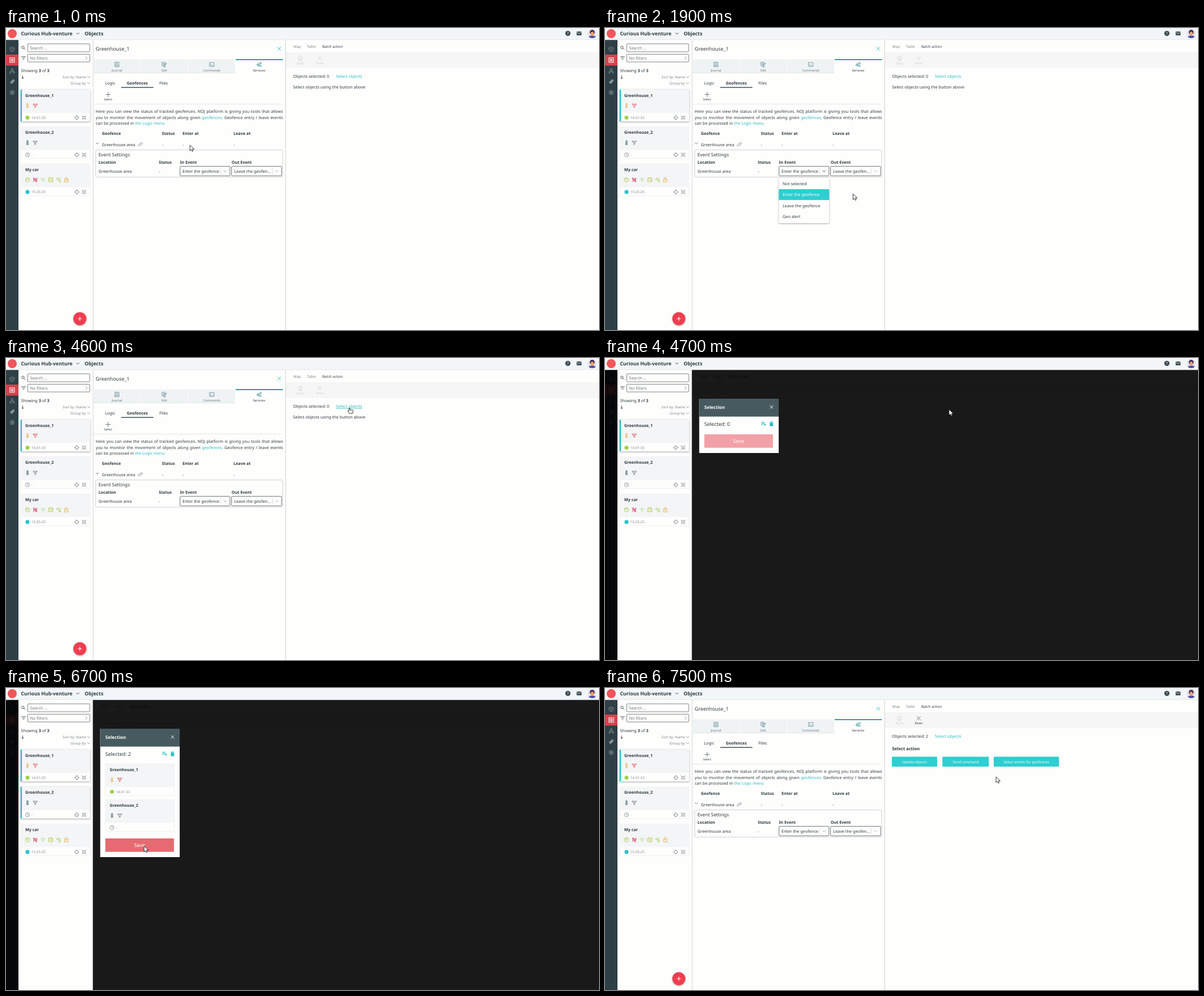
Recreate the animation shown at these times as an HTML page. Size 1048 by 534 pixels, loop 8000 ms.

```html
<!DOCTYPE html>
<html lang="en">
<head>
<meta charset="utf-8">
<title>Geofence objects</title>
<style>
  html, body { margin: 0; height: 100%; overflow: hidden; background: #fefefc; }
  svg { display: block; width: 100vw; height: 100vh; }
  svg, p { font-family: "Noto Sans", "Open Sans", sans-serif; text-rendering: geometricPrecision; }
  .raised { filter: drop-shadow(0 1px 1.5px #0005); }
  p { margin: 0; font-size: 7.28px; line-height: 10.2px; color: #2f3b40; white-space: nowrap; }
  p.full { text-align-last: justify; }
  p b { font-weight: 400; color: #2bbcc2; }
</style>
</head>
<body>
<svg viewBox="0 0 1048 534"></svg>
<script>
const stage = document.querySelector('svg');
const ink = '#2f3b40', grey = '#7d8689', teal = '#2fced0', link = '#2bbcc2', paper = '#fefefc', soft = '#f3f5f6';

// y is the middle of the capitals
const text = (x, y, s, size = 7.28, fill = ink, attrs = '') =>
  `<text x="${x}" y="${y + size * .36}" font-size="${size}" fill="${fill}" ${attrs}>${s}</text>`;
const bold = (x, y, s, size = 7.2, fill = ink) => text(x, y, s, size, fill, 'font-weight="700"');
const mid = (x, y, s, size, fill) => text(x, y, s, size, fill, 'text-anchor="middle"');
const rect = (x, y, w, h, fill, attrs = '') =>
  `<rect x="${x}" y="${y}" width="${w}" height="${h}" fill="${fill}" ${attrs}/>`;
const frame = (x, y, w, h, stroke, r = 1) => rect(x, y, w, h, paper, `stroke="${stroke}" stroke-width=".9" rx="${r}"`);
const dot = (x, y, r, fill) => `<circle cx="${x}" cy="${y}" r="${r}" fill="${fill}"/>`;
const icon = (x, y, d, color = grey, w = .8, fill = 'none') =>
  `<path transform="translate(${x} ${y})" d="${d}" fill="${fill}" stroke="${color}" stroke-width="${w}"/>`;
const ring = (r, x = 0, y = 0) => `M${x - r} ${y}a${r} ${r} 0 1 0 ${2 * r} 0a${r} ${r} 0 1 0 ${-2 * r} 0`;
const cross = r => `M${-r} ${-r}L${r} ${r}M${r} ${-r}L${-r} ${r}`;
const plus = r => `M${-r} 0H${r}M0 ${-r}V${r}`;

const shapes = {
  down: 'M-2.5-1.2L0 1.2 2.5-1.2',
  right: 'M-1.5-3L1.5 0-1.5 3',
  cube: 'M0-4.4L4-2.4V2L0 4.2-4 2V-2.4ZM-4-2.4L0-.4 4-2.4M0-.4V4.2',
  object: 'M-4-4H4V4H-4ZM-1.4-1.4H1.4V1.4H-1.4Z',
  tree: 'M-1.2-4H1.2V-1.6H-1.2ZM0-1.6V1.6M-3 1.6V.2H3V1.6M-4 1.6H-2V3.8H-4ZM2 1.6H4V3.8H2Z',
  tag: 'M-3.8 1L.8-3.6H3.6V-.8L-1 3.8Z',
  globe: ring(3.8) + ring(1.4) + 'M-3.5-1.5L3.5 1.5M-1.5 3.5L1.5-3.5',
  thermo: 'M-1.1 1V-3.2Q0-4.6 1.1-3.2V1A1.7 1.7 0 1 1-1.1 1Z',
  nodes: ring(1.1, -2.6, -2) + ring(1.1, 2.6, -2) + ring(1.1, 0, 2.4) + 'M-1.8-1L-.6 1.4M1.8-1L.6 1.4M0-3.4V-1',
  clock: ring(3.6) + 'M0-2.2V.2H1.8',
  gauge: ring(3.7) + 'M0 .5L1.8-1.8M-2.2 0A2.2 2.2 0 0 1 0-2.2',
  fan: ring(1.2, -2, -2) + ring(1.2, 2, -1) + ring(1.2, 1.4, 2.4) + 'M-3.6 3.2L3.6-3.2M-3.4-3.4L3.4 3.4M-3.4.8H0',
  wifi: 'M-4-1.2Q0-4.6 4-1.2M-2.6.6Q0-1.6 2.6.6M-1.2 2.2Q0 1.2 1.2 2.2M-.4 3.2H.4',
  battery: 'M-3.6-2.6H3.6V3.4H-3.6ZM-2.4-2.6V-3.8H-1M1-3.8H2.4V-2.6M-2.4.4H-.6M.6.4H2.4M1.5-.5V1.3',
  satellite: 'M-3.6-1.2L-1.2-3.6 1.4-1 -1-.0ZM-1 0L3.4 3.4M.4 3.4H3.4V.8M2-3.4Q3.6-2.4 3.4-.6',
  lock: 'M-3-.8H3V3.8H-3ZM-1.8-.8V-2.4A1.8 1.8 0 0 1 1.8-2.4V-.8M0 .8V2.2',
  locate: ring(2.9) + 'M0-4.4V-2M0 2V4.4M-4.4 0H-2M2 0H4.4',
  shrink: 'M-4-4L-1-1M1-1L4-4M-4 4L-1 1M1 1L4 4M-3-1H-1V-3M3-1H1V-3M-3 1H-1V3M3 1H1V3',
  book: 'M-3.6-4H3.6V4H-3.6ZM-3.6 1.8H3.6M-1.8-2H1.8M-1.8-.2H1.8',
  edit: 'M2-3.8H-4.2V2.2H-1M-2.6-1.8H2M-2.6 0H1M4.2-1.6L.4 2.6-.6 4.2 1-.6 3.4-2.4ZM-2 4.2H3',
  terminal: 'M-4-3.4H4V3.4H-4ZM-2.6-1.2L-1 .2-2.6 1.6M0 1.6H2.4',
  gears: ring(2.2, -1.6, .6) + ring(1.4, 2.4, -2.4) + ring(1.3, 2.4, 2.6) + ring(.7, -1.6, .6),
  chain: 'M-.4 1.6L-1.6 2.8A1.4 1.4 0 0 1-3.4.8L-1.6-1A1.4 1.4 0 0 1 .6-.6M.4-1.6L1.6-2.8A1.4 1.4 0 0 1 3.4-.8L1.6 1A1.4 1.4 0 0 1-.6.6',
  trash: 'M-3-2.6H3M-1.2-3.6H1.2M-2.4-1.4H2.4V3.8H-2.4Z',
  addList: 'M-4-2.4H2M-4-.4H2M-4 1.6H-.4M2.8-.4V4M.6 1.8H5'
};

function card(x, y, item, selected, tools) {
  const [name, time, color, icons] = item;
  const foot = y + 49.5;
  let s = `<g ${selected ? 'class="raised"' : ''}>` +
    rect(x, y, 122, 56, paper, 'stroke="#eceeee" stroke-width=".8"') + rect(x, y, 122, 41, soft) + '</g>';
  if (selected) s += rect(x - .6, y, 2.2, 56, '#2bbccb');
  s += bold(x + 7.5, y + 10, name);
  icons.forEach(([shape, tint], i) =>
    s += icon(x + 11.5 + i * 13.7, y + 28, shapes[shape], tint, .9, shape == 'thermo' ? tint + '99' : 'none'));
  s += color ? dot(x + 11.5, foot, 3.6, color) : icon(x + 11.5, foot, shapes.clock);
  s += text(x + 18.5, foot, time, 6.24, grey);
  if (tools) s += icon(x + 98.5, foot, shapes.locate) + icon(x + 111.5, foot, shapes.shrink);
  return s;
}
const items = [
  ['Greenhouse_1', '14:31:33', '#9fd24c', [['thermo', '#e8b86c'], ['nodes', '#e2565f']]],
  ['Greenhouse_2', '-', '', [['thermo', '#5f8078'], ['nodes', '#758388']]],
  ['My car', '15:25:25', '#2cc5cb', [['gauge', '#a5cc4a'], ['fan', '#d83a5c'], ['wifi', '#a9da7c'],
    ['battery', '#b5c83c'], ['satellite', '#a4c84a'], ['lock', '#e3b04e']]]
];

const header = rect(0, 0, 1048, 21, '#f3f6f8') + rect(0, 20.4, 1048, .8, '#dfe4e6') +
  dot(11, 10, 8, '#f0575a') +
  bold(26.5, 9.7, 'Curious Hub-venture', 8.75) + icon(127, 9.7, shapes.down, ink, .9) + bold(139, 9.7, 'Objects', 8.75) +
  dot(993, 9.6, 4.6, '#3d4c53') + mid(993, 9.6, '?', 7, '#fff') +
  rect(1008.5, 6.2, 8.6, 6.8, '#3d4c53', 'rx="1"') + icon(1012.8, 9.4, 'M-3.6-1.8L0 .8 3.6-1.8', '#fff') +
  dot(1036, 10, 8, '#e6e3ec') + dot(1036, 7.5, 4.3, '#42285e') +
  '<path d="M1029.5 15.5Q1036 10.5 1042.5 15.5Q1036 20.5 1029.5 15.5Z" fill="#4a4fb5"/>' +
  rect(1033.3, 6.4, 5.4, 7.4, '#f2a45f', 'rx="2.6"');

const sidebar = rect(0, 21, 22, 513, '#2e3f46') + rect(0, 47, 22, 19.4, '#d4434e') +
  icon(11, 37.5, shapes.cube, '#83929a') + icon(11, 56.7, shapes.object, '#fff', 1.1) +
  icon(11, 76, shapes.tree, '#83929a') + icon(11, 95, shapes.tag, '#83929a', .8, '#83929a') +
  icon(11, 114, shapes.globe, '#83929a');

const list = secondActive => rect(22, 21, 131.5, 513, paper) +
  icon(30.5, 35, ring(2.2, -.6, -.8) + 'M1 .8L3.6 3.4', '#4c585d', 1) + frame(38.4, 28, 109.6, 14, '#70787b') +
  text(42.5, 35, 'Search ...', 7.28, '#70787b') +
  icon(31, 53, 'M-4-2.4H4M-2.6 0H2.6M-1.2 2.4H1.2', '#4c585d', .9) + frame(38.4, 46.4, 109.6, 13.6, '#70787b') +
  text(42.5, 53.3, 'No filters', 7.28, '#70787b') + icon(142, 53.3, shapes.right) +
  text(26.5, 75, 'Showing <tspan font-weight="700">3</tspan> of <tspan font-weight="700">3</tspan>') +
  icon(29.5, 87, 'M0-3V2.6M-1.8 .8L0 2.8 1.8 .8', ink, .9) +
  text(100, 86.7, 'Sort by: Name', 6.24, grey) + icon(146, 86.7, shapes.down) +
  text(114, 97.5, 'Group by', 6.24, grey) + icon(146, 97.5, shapes.down) +
  items.map((item, i) => card(26.5, 109 + i * 65.7, item, i == 0 || i == 1 && secondActive, true)).join('');

const tabs = [['Journal', 'book'], ['Edit', 'edit'], ['Commands', 'terminal'], ['Services', 'gears']];
const select = (x, w, label, color) => frame(x, 244.6, w, 16.8, '#5f686c') + text(x + 4.6, 253, label) +
  rect(x + w - 17, 248, .7, 10, '#ccc') + icon(x + w - 8.6, 253.2, shapes.down, color, .9);
const headings = (y, xs, names) => names.map((name, i) => bold(xs[i], y, name)).join('');

const details = open => rect(153.5, 21, 340, 513, paper) + rect(153.3, 21, 1.6, 513, '#e2e5e5') +
  text(158.5, 36.5, 'Greenhouse_1', 8.84) + icon(483, 36.5, cross(3.2), link, .9) +
  tabs.map(([name, shape], i) => {
    const x = 154.5 + i * 83.8, active = i == 3;
    return (active ? rect(x, 55, 83.4, 1.8, '#218f9d') : rect(x, 55.5, 83, 24, '#eff3f4') + rect(x, 78.8, 83, .8, '#d9e0e2')) +
      icon(x + 41.5, 64.5, shapes[shape], active ? '#27828f' : '#5d858d') +
      mid(x + 41.5, 74.7, name, 5.72, active ? ink : '#6c7e84');
  }).join('') +
  text(175, 97.3, 'Logic') + bold(213.5, 97.3, 'Geofences') + text(271, 97.3, 'Files') +
  rect(203.5, 104.4, 57, 1.4, '#36454b') +
  icon(180.5, 117.5, plus(4.4), '#596468') + mid(180.5, 126.5, 'Select', 5.2) +
  rect(155, 134.2, 333, .8, '#dfe2e2') +
  `<foreignObject x="158.5" y="143.3" width="331" height="40">
    <p class="full">Here you can view the status of tracked geofences. NOJ platform is giving you tools that allows</p>
    <p class="full">you to monitor the movement of objects along given <b>geofences</b>. Geofence entry / leave events</p>
    <p>can be processed in <b>the Logic menu</b></p></foreignObject>` +
  headings(186.7, [169.5, 275.5, 312, 402], ['Geofence', 'Status', 'Enter at', 'Leave at']) +
  icon(161.3, 203.8, shapes.down, ink, .7) + text(169.5, 206, 'Greenhouse area') +
  icon(237.5, 205.6, shapes.chain, '#6a7478') + [275.5, 312, 402].map(x => text(x, 206, '-')).join('') +
  frame(158.6, 215.6, 330.4, 48, '#c9cdce', 2) + text(163.5, 224.3, 'Event Settings', 8.32) +
  headings(237.2, [163.5, 270, 307.5, 398.8], ['Location', 'Status', 'In Event', 'Out Event']) +
  text(163.5, 253, 'Greenhouse area') + text(270, 253, '-') +
  select(307.5, 88.3, 'Enter the geofence', open ? ink : '#8e9699') + select(398.6, 88.4, 'Leave the geofen...', '#a5acae') +
  `<g class="raised">${dot(130.5, 514, 11.5, '#f13d50')}</g>` + icon(130.5, 514, plus(3.6), '#fff', 1.1);

const dropdown = `<g class="raised">${rect(307.2, 265.4, 89, 79.6, paper)}</g>` + rect(307.2, 285, 89, 19.2, teal) +
  ['Not selected', 'Enter the geofence', 'Leave the geofence', 'Geo alert']
    .map((name, i) => text(314, 275.4 + i * 19.3, name, 7.28, i == 1 ? '#fff' : ink)).join('');

const button = (x, w, label) => rect(x, 121.5, w, 17.4, teal, 'rx="1"') + mid(x + w / 2, 130.3, label, 6.24, '#fff');
const actions = (done, hover) => rect(493.5, 21, 900, 513, paper) + rect(493.4, 21, 1.6, 513, '#dfe2e2') +
  text(508, 32.5, 'Map', 6.24, grey) + text(532, 32.5, 'Table', 6.24, grey) + text(559, 32.5, 'Batch action', 6.24) +
  rect(495, 43, 900, 27.5, '#f5f6f5') +
  icon(520.3, 53.5, ring(3.6) + 'M-1.6 0L-.4 1.3 1.8-1.2M-2 4.6L0 3.6 2 4.6', '#cdd0d0') + mid(520.3, 62.2, 'Apply', 5.2, '#d0d3d3') +
  icon(554.3, 53.5, cross(3.4), done ? '#4c585d' : '#cdd0d0') + mid(554.3, 62.2, 'Reset', 5.2, done ? ink : '#d0d3d3') +
  text(507.3, 85.3, 'Objects selected: ' + (done ? 2 : 0)) +
  text(583, 85.3, 'Select objects', 7.28, link, hover ? 'text-decoration="underline"' : '') +
  (done
    ? bold(507.3, 107, 'Select action', 7.7) + button(507, 80, 'Update objects') +
      button(596.3, 82, 'Send command') + button(687, 115.3, 'Select events for geofences')
    : text(507.3, 104.5, 'Select objects using the button above'));

function modal(count) {
  const grow = count ? 5 + count * 63 : 0;
  return rect(166.5, 72, 140.5, 96 + grow, paper) + rect(166.5, 72, 140.5, 31.6, '#475a5f') +
    bold(175.5, 87, 'Selection', 8, '#fff') + icon(294.3, 86.6, cross(2.8), '#fff', 1) +
    text(175.5, 116.7, 'Selected: ' + count, 9) +
    icon(280, 116, shapes.addList, link, 1) + icon(294.2, 116.3, shapes.trash, link, .9, link) +
    items.slice(0, count).map((item, i) => card(175.8, 134 + i * 63.3, item, false, false)).join('') +
    rect(175.5, 135 + grow, 121.3, 23.7, count ? '#e66a72' : '#f2a1a6') + mid(236, 147 + grow, 'Save', 9, '#fff');
}

// [time, x, y] of the pointer tip
const track = [
  [0, 325, 207], [200, 355, 244], [400, 355, 244], [500, 357, 255], [1000, 357, 255], [1100, 357, 260],
  [1200, 357, 260], [1600, 362, 345], [1700, 362, 345], [2300, 591, 190], [2500, 591, 190], [2800, 583, 134],
  [2900, 564, 77], [3000, 564, 77], [3100, 562, 48], [3200, 562, 48], [3300, 567, 42], [3400, 567, 42],
  [3700, 570, 37], [4100, 570, 37], [4500, 607, 88.5], [4600, 607, 88.5], [4700, 608, 91], [5000, 608, 91],
  [5700, 100, 130], [5900, 100, 130], [6200, 100, 195], [6600, 244, 279.5], [6800, 244, 279.5],
  [7500, 691, 157], [8000, 691, 157]
];
function pointer(t) {
  const i = track.findIndex(k => k[0] > t);
  const [t0, x0, y0] = track[i - 1], [t1, x1, y1] = track[i];
  const p = (t - t0) / (t1 - t0), x = x0 + (x1 - x0) * p, y = y0 + (y1 - y0) * p;
  if (t == 2800)
    return icon(x, y, 'M-2-5.4Q0-5.4 0-4.2 0-5.4 2-5.4M0-4.4V4.4M-2 5.4Q0 5.4 0 4.2 0 5.4 2 5.4M-1 1H1', '#222', 1.1);
  if (t == 4500 || t == 4600)
    return icon(x, y, 'M-.9.3Q0-.6.9.3V3.4H5.6Q6.6 3.6 6.4 5L5.6 9.4H-.4L-3 5.6Q-2.8 4.2-.9 5.4Z', '#222', .9, '#fff');
  return icon(x, y, 'M0 0V10.2L2.4 8 4 11.3 5.8 10.5 4.2 7.2H7.5Z', '#222', .9, '#fff');
}

function scene(t) {
  const open = t >= 800 && t < 4200;
  const caret = open && (t < 1100 || (t - 1100) % 1000 < 500);
  const count = t < 5700 ? 0 : t < 6200 ? 1 : 2;
  const rows = list(t >= 6200 && t < 6900);
  if (t >= 4700 && t < 6800)
    return sidebar + `<g transform="translate(-340)">${actions(false, false)}</g>` +
      rect(0, 21, 1048, 513, '#000', 'opacity=".9"') + rows + header + modal(count) + pointer(t);
  return sidebar + rows + details(open) + actions(t >= 6800, t == 4500 || t == 4600) + header +
    (open ? dropdown : '') + (caret ? rect(310.8, 247.5, .9, 10.5, ink) : '') + pointer(t);
}

let shown = -1;
function tick(now) {
  const t = Math.floor(now % 8000 / 100) * 100;
  if (t != shown) stage.innerHTML = scene(shown = t);
  requestAnimationFrame(tick);
}
tick(performance.now());
</script>
</body>
</html>
```
